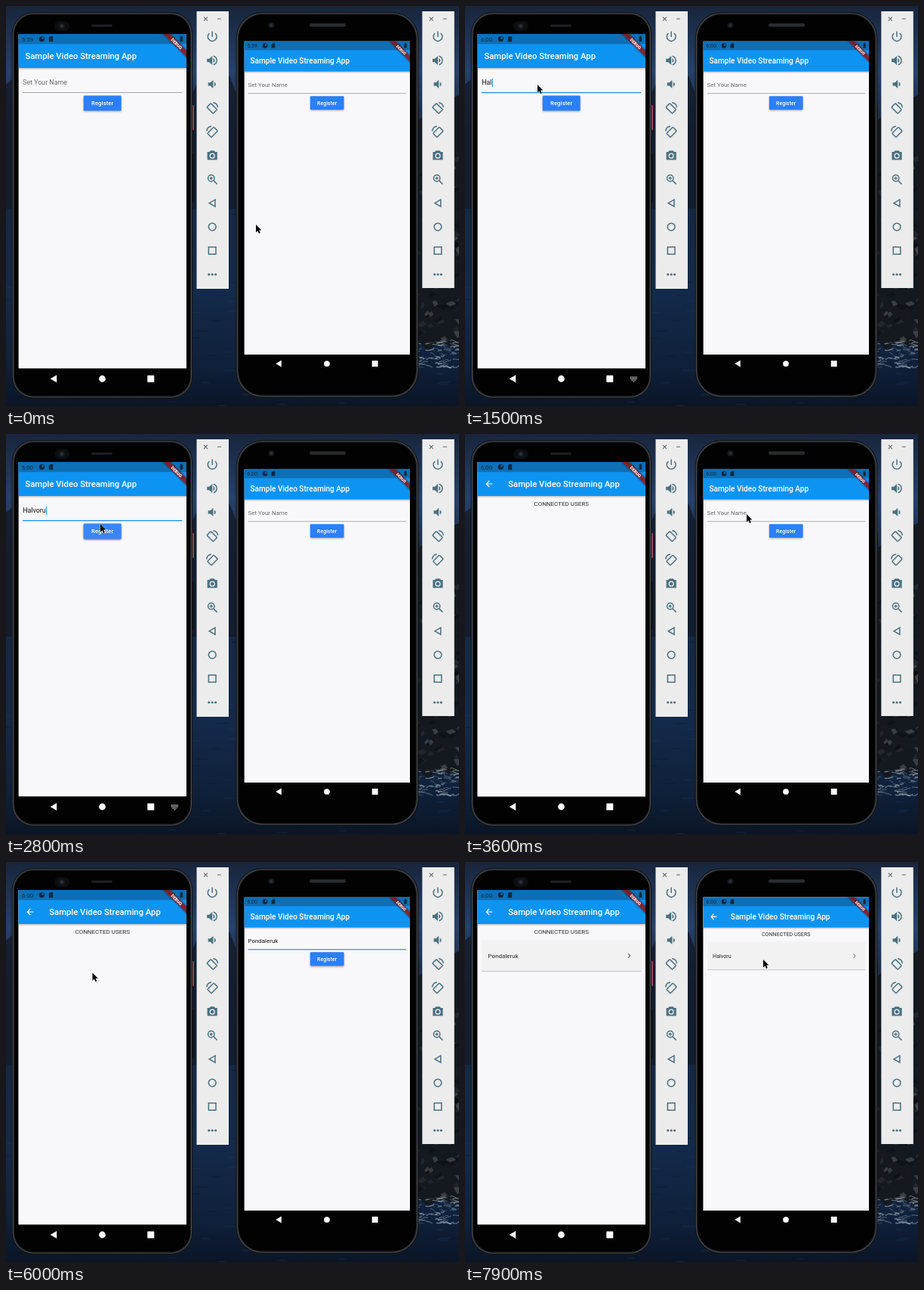
Animation of 600x529 px, one loop 8 s. Source, as an HTML page:

```html
<!DOCTYPE html>
<html lang="en">
<head>
<meta charset="utf-8">
<title>Two emulators</title>
<style>
  html, body { margin: 0; width: 100%; height: 100%; overflow: hidden; background: #14294a; }
  svg { display: block; width: 100vw; height: 100vh; font-family: Roboto, sans-serif; }
  .line { fill: none; stroke: currentColor; stroke-width: 1.5; }
  .m { font-weight: 500; }
</style>
</head>
<body>
<script>
const LOOP = 8000, STEP = 100;
const NAMES = { a: 'Halvoru', b: 'Pondaleruk' };

// Small seeded generator for the wallpaper texture
let seed = 11;
const rnd = (lo, hi) => {
  seed = (seed * 16807) % 2147483647;
  return +(lo + (hi - lo) * seed / 2147483647).toFixed(1);
};
const many = (n, fn) => Array.from({ length: n }, (_, i) => fn(i)).join('');
const rect = (x, y, w, h, fill, r = 0) =>
  `<rect x="${x}" y="${y}" width="${w}" height="${h}" rx="${r}" fill="${fill}"/>`;
const text = (x, y, size, fill, str, extra = '') =>
  `<text x="${x}" y="${y}" font-size="${size}" fill="${fill}" ${extra}>${str}</text>`;
const grad = (id, ...stops) => `<linearGradient id="${id}" x2="0" y2="1">${stops.map(([o, c, a = 1]) =>
  `<stop offset="${o}" stop-color="${c}" stop-opacity="${a}"/>`).join('')}</linearGradient>`;

function wallpaper() {
  const ripples = many(170, () => {
    const x = rnd(-10, 600), y = rnd(275, 529);
    return `<path d="M${x} ${y}q${rnd(3, 7)} ${rnd(-1.5, 1.5)} ${rnd(9, 18)} 0" stroke="${rnd(0, 1) > .5 ? '#1f3a5f' : '#0a1628'}" opacity=".45" fill="none"/>`;
  });
  const rocks = many(130, () => {
    const x = rnd(538, 600), y = rnd(190, 448), s = rnd(3, 9);
    const c = ['#0d1117', '#161a21', '#272a30', '#45464a'][Math.floor(rnd(0, 3.99))];
    return `<path d="M${x} ${y}l${s} ${rnd(-6, 0)} ${s * .6} ${rnd(2, 5)} ${-s} ${rnd(2, 6)}z" fill="${c}" opacity=".8"/>`;
  });
  const foam = many(70, () => {
    const x = rnd(538, 596), y = rnd(442, 478);
    return `<path d="M${x} ${y}q3 ${rnd(-4, 3)} ${rnd(4, 12)} ${rnd(-2, 3)}" stroke="#a4b0bd" stroke-width="${rnd(.6, 2)}" opacity="${rnd(.2, .75)}" fill="none"/>`;
  });
  return rect(0, 0, 600, 529, 'url(#sky)') +
    `<path d="M0 104L9 96 16 110 240 130 252 104 272 120 296 92 306 118V268H0z" fill="#131c2b" opacity=".85"/>` +
    ripples +
    `<path d="M536 160L570 130 600 118V452L572 446 558 456 536 430z" fill="#141920"/>` + rocks + foam;
}

// Toolbar glyphs, each centred on 0,0
const line = d => `<path class="line" d="${d}"/>`;
const solid = d => `<path fill="currentColor" d="${d}"/>`;
const turn = flip => `<g transform="scale(${flip} 1)"><rect class="line" x="-3.7" y="-5.9" width="7.4" height="11.8" rx="1" transform="translate(-.4 .6) rotate(-45)"/>${
  line('M1.2-7.2A7.3 7.3 0 0 1 7.4-.8')}</g>`;
const GLYPHS = [
  line('M-3.8-4.5A5.9 5.9 0 1 0 3.8-4.5M0-7V.6'),
  solid('M-7-2.3h3L0-6V6L-4 2.3h-3zM1.3-3a3.2 3.2 0 0 1 0 6z') + line('M1.5-5.8a6 6 0 0 1 0 11.6'),
  solid('M-5.5-2.2h3L1.2-5.6V5.6L-2.5 2.2h-3zM2.6-3a3.2 3.2 0 0 1 0 6z'),
  turn(1), turn(-1),
  solid('M-2.5-6.5h5L4-4.8h2.6v10.6H-6.6V-4.8H-4z') + '<circle r="3" cy=".4" fill="#4a7081" stroke="#ececec" stroke-width="1.3"/>',
  '<circle class="line" cx="-1.4" cy="-1.4" r="4.2"/>' + line('M1.8 1.8L6.4 6.4M-3.4-1.4h4M-1.4-3.4v4'),
  line('M3.8-4.6L-4 0 3.8 4.6z'),
  '<circle class="line" r="4.9"/>',
  line('M-4.8-4.8h9.6v9.6h-9.6z'),
  [-4.4, 0, 4.4].map(x => `<circle cx="${x}" r="1.6" fill="currentColor"/>`).join('')
];
const toolbar = (x, h) => `<g transform="translate(${x} 0)" color="#4a7081">
  ${rect(0, 7, 42.5, h, '#ececec')}
  <path d="M9.5 14.7l5 5m0-5l-5 5M27.5 17h5" stroke="#5f6468" stroke-width="1.1"/>
  ${GLYPHS.map((g, i) => `<g transform="translate(20.7 ${40.5 + i * 31.45})">${g}</g>`).join('')}</g>`;

const bar = (w, x, title) => rect(0, 0, w, 45, '#0d94f3') + rect(0, 0, w, 13.3, '#0e6fb4') +
  rect(0, 45, w, 3, 'url(#shade)') + text(x, 33, 11.3, '#fff', title, 'class="m"');

// Corner ribbon: a soft shadow under a translucent band
const ribbon = w => `<g transform="translate(${w} 0) rotate(45)">
  <rect x="-24" y="15.2" width="48" height="6.5" fill="#000" opacity=".6" filter="url(#blur)"/>
  <rect x="-24" y="15.2" width="48" height="6.5" fill="#b71c1c" opacity=".63"/>
  ${text(0, 20.4, 5.6, '#fff', 'DEBUG', 'text-anchor="middle" font-weight="900"')}</g>`;

// App screen in local units; the second handset scales it down
function app(id, w, h, peer) {
  const mid = w / 2, title = 'Sample Video Streaming App';
  const center = 'text-anchor="middle"';
  return `<clipPath id="${id}clip"><rect width="${w}" height="${h}"/></clipPath>
  <g clip-path="url(#${id}clip)">
    ${rect(0, 0, w, h, '#f8f7fa')}
    ${bar(w, 9, title)}
    <g id="${id}text">${text(5.8, 67.4, 8.85, '#111', '')}</g>
    <rect id="${id}caret" y="59" width="1" height="11" fill="#1a8cf0"/>
    <rect id="${id}rule" x="5.8" width="${w - 11.6}"/>
    <rect id="${id}glow" x="${mid - 25}" y="82.5" width="50" height="20.5" rx="1.5" fill="#000" filter="url(#blur)"/>
    ${rect(mid - 25, 81.5, 50, 20, '#2b7ff8', 1.2)}
    <rect id="${id}press" x="${mid - 25}" y="81.5" width="50" height="20" rx="1.2" fill="#fff" opacity=".06"/>
    ${text(mid, 94.2, 7.7, '#fff', 'Register', center + ' class="m" letter-spacing=".1"')}
    <g id="${id}page">
      ${rect(0, 0, w, h, '#f8f7fa')}
      ${bar(w, 40.8, title)}
      <path d="M20.1 29h-8.2m4-4.1L11.8 29l4.1 4.1" fill="none" stroke="#fff" stroke-width="1.2"/>
      ${text(mid, 57.9, 8, '#2c2c2e', 'CONNECTED USERS', center)}
      <g id="${id}list">
        ${rect(5.8, 66, w - 11.6, 42, '#f2f2f2')}${rect(5.8, 107.2, w - 11.6, .9, '#bdbdbf')}
        ${text(14.2, 89.6, 8, '#222', peer)}
        <path d="M${w - 23.2} 83.8l3 3.2-3 3.2" fill="none" stroke="#666" stroke-width="1.1"/>
      </g>
    </g>
    <g fill="#0c2a45">
      <text id="${id}clock" x="4.6" y="9.7" font-size="7.8"></text>
      <circle cx="31" cy="6.6" r="3.7"/><path d="M31 6.6V3.8a2.7 2.7 0 0 1 2.7 2.8z" fill="#0e6fb4"/>
      <path d="M40.4 4.8l1.8-1.8h3.6v7.2h-5.4z"/>
      <path d="M${w - 15} 10h-6l6-6zM${w - 8.5} 3.4h1v-.8h1.7v.8h1V10h-3.7z"/>
    </g>
    ${ribbon(w)}
  </g>`;
}

// Navigation row: back, home, recents and the keyboard key
const nav = (id, x, y, gap, k, key) => `<g fill="#fff">
  <path transform="translate(${x - gap} ${y}) scale(${k})" d="M4-5L-4.5 0 4 5z"/>
  <circle cx="${x}" cy="${y}" r="${4.4 * k}"/>
  ${rect(x + gap - 4.5 * k, y - 4.5 * k, 9 * k, 9 * k, '#fff', .5)}
  <g id="${id}key" transform="translate(${key} ${y}) scale(${k})">
    <path d="M-4.5-2.2h9M-4.5-.2h9M-3 1.8h6" stroke="#ddd" stroke-width="1.2" stroke-dasharray="1.3 .6"/>
    <path d="M-1.5 3.4h3L0 4.6z"/>
  </g></g>`;

// Handset: dark edge, lighter rim, black face
const body = (x, y, w, h, r) =>
  [[0, '#121315'], [1.2, '#4b4c50'], [2.3, '#1a1b1d'], [3.6, '#020203']].map(([d, c]) =>
    rect(x + d, y + d, w - 2 * d, h - 2 * d, c, r - d)).join('');

const lens = (x, y, r) => `<circle cx="${x}" cy="${y}" r="${r}" fill="#15171b"/><circle cx="${x}" cy="${y}" r="${r * .5}" fill="#2c3038"/>`;

document.body.innerHTML = `<svg viewBox="0 0 600 529" preserveAspectRatio="none">
  <defs>
    ${grad('sky', [0, '#18253c'], [.16, '#25416a'], [.3, '#1a2b45'], [.5, '#142843'], [.72, '#142a4a'], [.9, '#0f2039'], [1, '#0b1526'])}
    ${grad('shade', [0, '#000', .22], [1, '#000', 0])}
    <filter id="blur" x="-20%" y="-60%" width="140%" height="220%"><feGaussianBlur stdDeviation="1.2"/></filter>
  </defs>
  ${wallpaper()}
  ${rect(245.5, 131, 3.2, 33, '#c9546a', 1)}${rect(245.5, 195, 3, 64, '#0b0c0f', 1)}
  ${rect(543.5, 131, 3.4, 30, '#1b1c1f', 1)}${rect(543.5, 180, 3.4, 60, '#1b1c1f', 1)}
  ${body(7.7, 8, 239.6, 511, 29)}
  ${rect(113, 24.5, 28, 3, '#202124', 1.5)}${rect(64, 20, 20, 13, '#0d0e10', 6.5)}${lens(74, 26.5, 4.6)}
  ${body(304.6, 8, 241.8, 510, 35)}
  ${rect(402, 23, 48, 4.5, '#2a2b2e', 2.2)}${lens(351.5, 25.5, 4)}
  <g transform="translate(16.4 37)">${app('a', 222.6, 442.6, NAMES.b)}</g>
  <g transform="translate(315.4 46.5) scale(.893)">${app('b', 246, 464.2, NAMES.a)}</g>
  ${nav('a', 127.5, 493, 64.3, 1, 223.5)}
  ${nav('b', 425, 473, 63.7, .88, 520)}
  ${toolbar(252.5, 367)}${toolbar(551.3, 366)}
  <path id="mouse" d="M0 0V10.4L2.4 8.2 4 11.9 5.8 11.1 4.2 7.5H7.4z" fill="#000" stroke="#fff" stroke-width=".7" paint-order="stroke"/>
</svg>`;

// Pointer stops: time, x, y
const PATH = [
  [0, 331, 289], [200, 331, 289], [800, 96, 104], [2300, 96, 104], [2600, 125, 119],
  [3100, 125, 119], [3500, 373, 106], [5000, 373, 106], [5300, 424, 126], [5500, 424, 126],
  [5900, 114.5, 146.5], [6500, 114.5, 146.5], [6800, 112, 128], [7400, 112, 128], [7700, 395, 129]
];
const USERS = [
  { id: 'a', name: NAMES.a, focus: 1000, keys: [1200, 1300, 1500, 1700, 1900, 2100, 2300], press: [2700, 3000], blur: 3000, push: 3000, list: 6400 },
  { id: 'b', name: NAMES.b, focus: 3800, keys: [4000, 4100, 4200, 4300, 4400, 4500, 4700, 4800, 4900, 5000], press: [5500, 5800], blur: 5500, push: 6200, list: 6200 }
];

const $ = id => document.getElementById(id);
const set = (id, attrs) => { for (const k in attrs) $(id).setAttribute(k, attrs[k]); };
const show = (id, on) => set(id, { visibility: on ? 'visible' : 'hidden' });
const clamp = v => Math.max(0, Math.min(1, v));
const ease = v => v * v * (3 - 2 * v);

function pointer(t) {
  const i = PATH.findIndex(p => p[0] > t);
  if (i < 0) return PATH[PATH.length - 1].slice(1);
  const [t0, x0, y0] = PATH[i - 1], [t1, x1, y1] = PATH[i];
  const k = ease((t - t0) / (t1 - t0));
  return [x0 + (x1 - x0) * k, y0 + (y1 - y0) * k];
}

function drawUser(u, t) {
  const { id } = u;
  const focused = t >= u.focus, active = focused && t < u.blur;
  const typed = u.name.slice(0, u.keys.filter(k => k <= t).length);
  const label = $(id + 'text').firstChild;
  label.textContent = typed || 'Set Your Name';
  label.setAttribute('fill', typed ? '#111' : '#6a6a6d');

  const last = Math.max(u.focus, ...u.keys.filter(k => k <= t));
  show(id + 'caret', active && (t - last) % 1000 <= 500);
  set(id + 'caret', { x: 6.3 + (typed ? label.getComputedTextLength() : 0) });
  set(id + 'rule', focused ? { y: 76.9, height: 1.3, fill: '#168df0' } : { y: 77.2, height: .7, fill: '#858588' });

  const down = t >= u.press[0] && t < u.press[1];
  show(id + 'press', down);
  set(id + 'glow', { opacity: down ? .5 : t >= u.press[1] ? .38 : .25 });
  show(id + 'key', active);

  // New route fades in while sliding up
  const p = clamp((t - u.push) / 300), k = 1 - (1 - p) ** 3;
  set(id + 'page', { opacity: clamp(p * 1.4), transform: `translate(0 ${(1 - k) * 110})` });
  set(id + 'list', { opacity: t >= u.list ? 1 : 0 });
  $(id + 'clock').textContent = t < 500 ? '5:59' : '6:00';
}

function draw(now) {
  const t = Math.floor(now % LOOP / STEP) * STEP;
  USERS.forEach(u => drawUser(u, t));
  set('mouse', { transform: `translate(${pointer(t).map(v => v.toFixed(1)).join(' ')})` });
}

const start = performance.now();
const tick = now => { draw(Math.max(0, now - start)); requestAnimationFrame(tick); };
draw(0);
requestAnimationFrame(tick);
</script>
</body>
</html>
```
